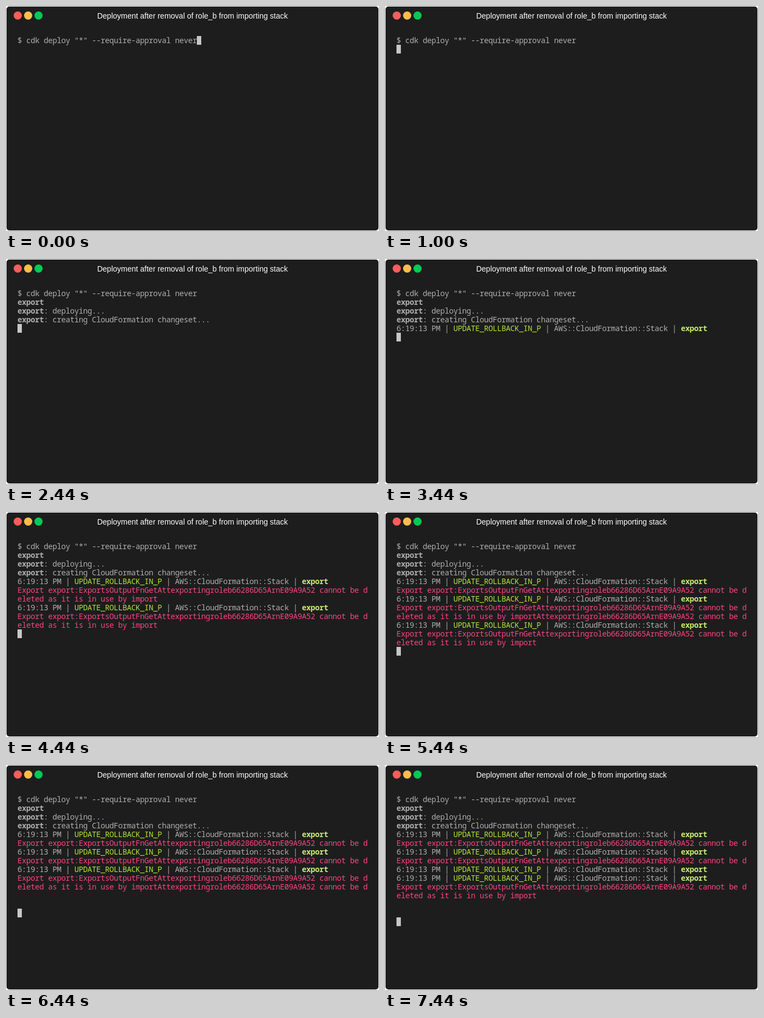
These frames come from a looping animation (682 by 412 pixels, 8 s). An HTML page with a canvas:

```html
<!DOCTYPE html>
<html lang="en">
<head>
<meta charset="utf-8">
<title>Terminal</title>
<style>
html, body { margin: 0; width: 100%; height: 100%; overflow: hidden; background: #fff; }
canvas { display: block; }
</style>
</head>
<body>
<canvas id="stage" width="682" height="412"></canvas>
<script>
const ctx = document.getElementById('stage').getContext('2d');
const LOOP = 8000, LEFT = 21, TOP = 55, COL = 8, ROW = 16;
const GREY = '#afafaf', RED = '#fc4384', GREEN = '#b3e33b', LIME = '#c8ed71', CURSOR = '#c7c7c7';
const MONO = '14px "Noto Sans Mono", "DejaVu Sans Mono", monospace';

// A line is a list of runs: [text, colour, bold]
const plain = text => [[text, GREY]];
const red = text => [[text, RED]];
const named = text => [['export', GREY, true], [text, GREY]];

const command = plain('$ cdk deploy "*" --require-approval never');
const status = [
  ['6:19:13 PM | ', GREY], ['UPDATE_ROLLBACK_IN_P', GREEN],
  [' | AWS::CloudFormation::Stack | ', GREY], ['export', LIME, true]
];
const tail = 'Attexportingroleb66286D65ArnE09A9A52 cannot be d';
const error = red('Export export:ExportsOutputFnGet' + tail);
const rest = red('eleted as it is in use by import');
const mixed = red('eleted as it is in use by import' + tail);

const started = [command, named(''), named(': deploying...')];
const head = [...started, named(': creating CloudFormation changeset...')];
const pair = [status, error];

// Each step: start time, lines, cursor row, cursor column
const steps = [
  [0, [command], 0, 41],
  [1000, [command], 1, 0],
  [2000, started, 3, 0],
  [2440, head, 4, 0],
  [3440, [...head, status], 5, 0],
  [4440, [...head, ...pair, rest, ...pair, rest], 10, 0],
  [5440, [...head, ...pair, ...pair, mixed, ...pair, rest], 12, 0],
  [6440, [...head, ...pair, ...pair, ...pair, mixed], 13, 0],
  [7440, [...head, ...pair, ...pair, status, ...pair, rest], 14, 0]
];

function drawWindow() {
  ctx.fillStyle = '#fff';
  ctx.fillRect(0, 0, 682, 412);
  ctx.fillStyle = '#1d1d1d';
  ctx.beginPath();
  ctx.roundRect(1, 1, 680, 410, 5);
  ctx.fill();
  ['#ff5c5c', '#ffbd4c', '#00ca56'].forEach((color, i) => {
    ctx.fillStyle = color;
    ctx.beginPath();
    ctx.arc(21.5 + 19 * i, 17.5, 7.5, 0, Math.PI * 2);
    ctx.fill();
  });
  ctx.font = '14px "Liberation Sans", Arial, sans-serif';
  ctx.letterSpacing = '0px';
  ctx.textAlign = 'center';
  ctx.fillStyle = '#fff';
  ctx.fillText('Deployment after removal of role_b from importing stack', 341, 23);
}

function drawLine(line, row) {
  let x = LEFT;
  for (const [text, color, bold] of line) {
    ctx.font = (bold ? 'bold ' : '') + MONO;
    ctx.letterSpacing = '0px';
    ctx.letterSpacing = COL - ctx.measureText('M'.repeat(20)).width / 20 + 'px';
    ctx.fillStyle = color;
    ctx.fillText(text, x, TOP + ROW * row + 13);
    x += COL * text.length;
  }
}

function draw(time) {
  const [, lines, row, col] = steps.findLast(step => step[0] <= time);
  drawWindow();
  ctx.textAlign = 'left';
  lines.forEach(drawLine);
  ctx.fillStyle = CURSOR;
  ctx.fillRect(LEFT + COL * col, TOP + ROW * row, COL, ROW);
}

const start = performance.now();
function tick() {
  draw((performance.now() - start) % LOOP);
  requestAnimationFrame(tick);
}
tick();
</script>
</body>
</html>
```
